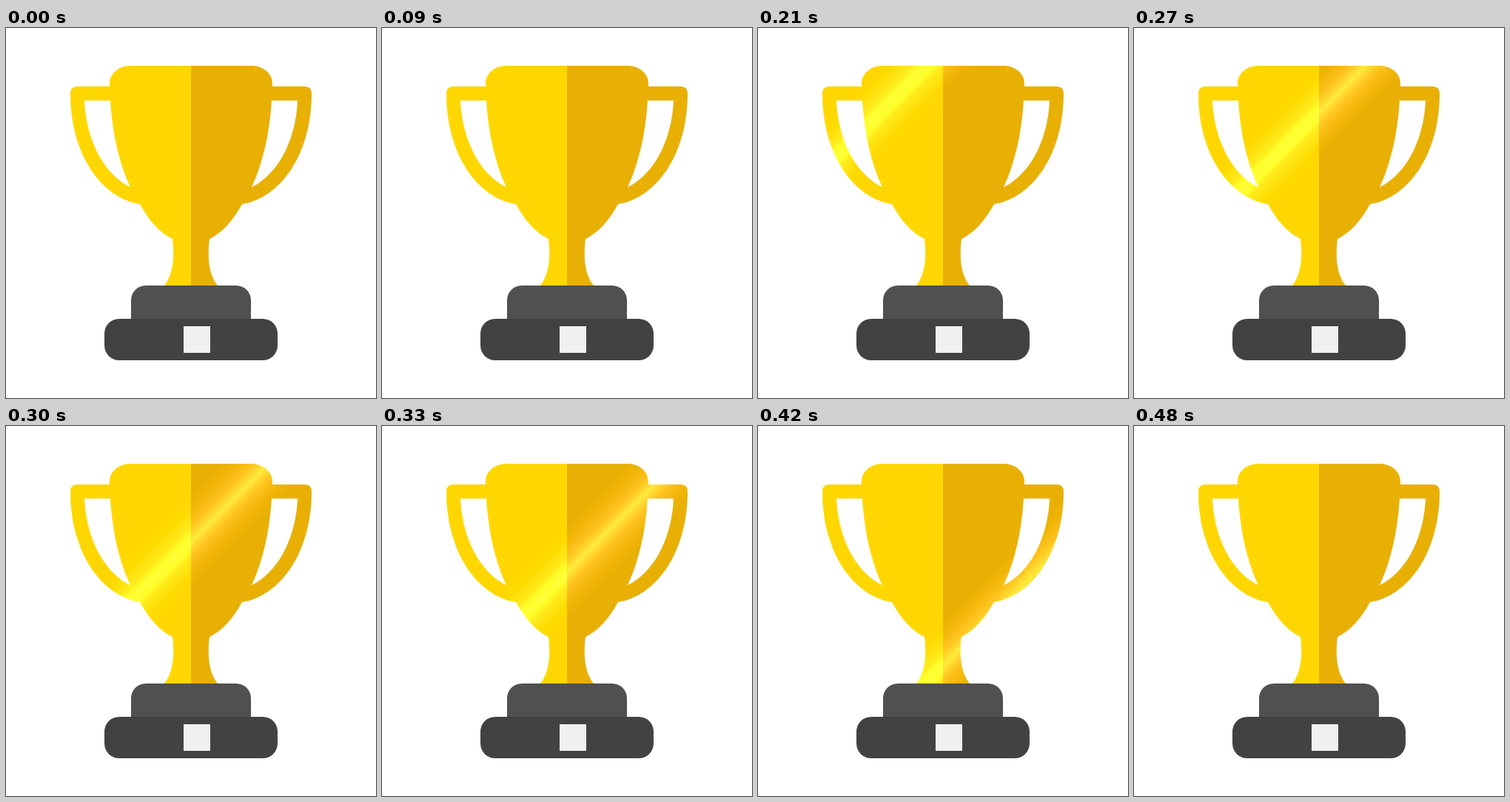
Animation of 500 by 500 pixels, one loop 4530 ms. Source, as an HTML page with a canvas:

```html
<!DOCTYPE html>
<html lang="en">
<head>
<meta charset="utf-8">
<title>Trophy</title>
<style>
html, body { margin: 0; width: 100%; height: 100%; overflow: hidden; background: #fff; }
canvas { display: block; width: 500px; height: 500px; }
</style>
</head>
<body>
<canvas id="stage" width="500" height="500"></canvas>
<script>
const ctx = document.getElementById('stage').getContext('2d');
const LOOP = 4530, STEP = 30, SHINE_START = 90, SHINE_END = 480;

// Left halves; the right side is a mirror image about x = 250.
const cup = new Path2D('M250 51H168C153 51 140 61 140 75C141 128 150 177 168 215' +
  'Q173 226 181 238C193 260 208 277 225 285C228 310 226 333 214 348H250Z');
const handle = new Path2D('M146 79H96Q87 79 87 89C87 170 129 230 181 238' +
  'L190 230L175 216L168 215C132 198 108 150 106 98H146Z');

// Light added across the band: offset along x + y, then colour.
const BAND = 65;
const glow = [
  [-65, '#000000'], [-45, '#080402'], [-20, '#17141c'], [0, '#173a38'],
  [20, '#17141c'], [45, '#080402'], [65, '#000000']
];

function half(color, mirrored) {
  ctx.save();
  if (mirrored) {
    ctx.translate(500, 0);
    ctx.scale(-1, 1);
  }
  ctx.fillStyle = color;
  ctx.fill(handle);
  ctx.fill(cup);
  ctx.restore();
}

function block(x, y, w, h, radii, color) {
  ctx.fillStyle = color;
  ctx.beginPath();
  ctx.roundRect(x, y, w, h, radii);
  ctx.fill();
}

function shine(t) {
  const sum = 448 + 1.4 * (t - 330);
  const a = (sum - BAND) / 2, b = (sum + BAND) / 2;
  const light = ctx.createLinearGradient(a, a, b, b);
  for (const [offset, color] of glow) {
    light.addColorStop((offset + BAND) / (2 * BAND), color);
  }
  ctx.save();
  ctx.globalCompositeOperation = 'lighter';
  ctx.fillStyle = light;
  ctx.fillRect(0, 0, 500, 348);
  ctx.restore();
}

function draw(time) {
  const t = Math.floor((time % LOOP) / STEP) * STEP;
  ctx.fillStyle = '#fff';
  ctx.fillRect(0, 0, 500, 500);
  half('#ffd700', false);
  half('#e8b004', true);
  if (t >= SHINE_START && t < SHINE_END) shine(t);
  block(169, 348, 162, 45, [20, 20, 0, 0], '#505050');
  block(133, 393, 234, 56, 20, '#424242');
  block(240, 403, 36, 36, 0, '#f0f0f0');
}

let start;
function tick(now) {
  start ??= now;
  draw(now - start);
  requestAnimationFrame(tick);
}
draw(0);
requestAnimationFrame(tick);
</script>
</body>
</html>
```
